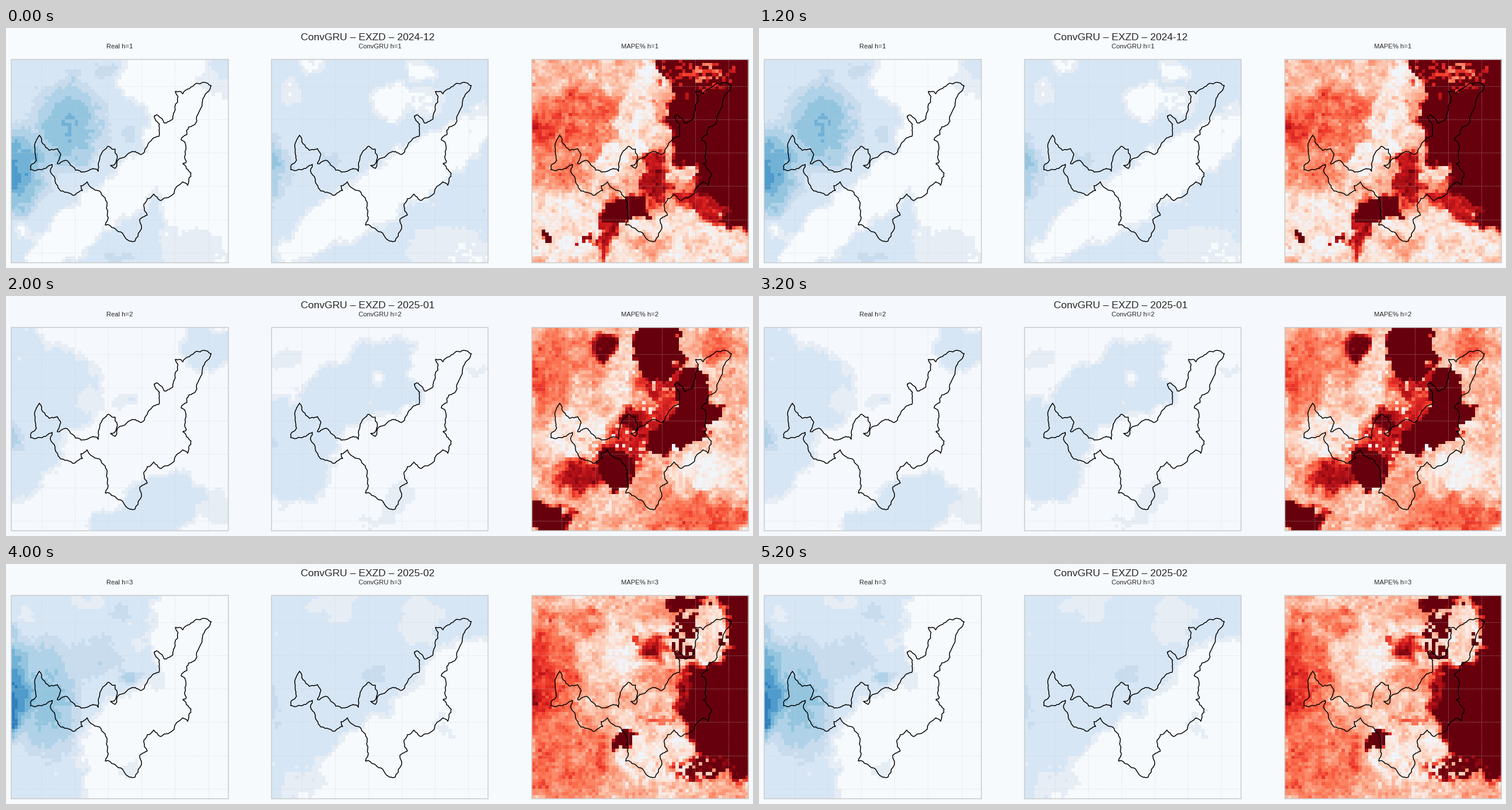
Animation of 1280 by 412 pixels, one loop 6000 ms. Source, as a matplotlib script:

```python
import numpy as np
import matplotlib.pyplot as plt
from matplotlib.animation import FuncAnimation
from matplotlib.colors import LinearSegmentedColormap, ListedColormap
from matplotlib.patches import Rectangle

W, H = 1280, 412
ROWS, COLS = 61, 65
LEFT, TOP, WIDTH, HEIGHT = 9, 54.2, 371.5, 348.6
STEP = 445.8
INK = "#262626"
MONTHS = ["2024-12", "2025-01", "2025-02"]
PAPER = ["#f7fbfe", "#f5f8fd", "#f6fafc"]
BLUES = ["#e6edf5", "#d7e6f5", "#c8dcee", "#b0d2e8", "#94c5df",
         "#72b2d7", "#4f9bcb", "#3080bd", "#1764ab", "#084a91"]
REDS = LinearSegmentedColormap.from_list("heat", [
    "#f1f5fa", "#fee3d6", "#fcbba1", "#fc9272", "#fb6a4a",
    "#ef3b2c", "#cb181d", "#a50f15", "#67000d"])

plt.rcParams["font.family"] = "Liberation Sans"


def smooth(a, times):
    """Spread each cell over its neighbours."""
    for _ in range(times):
        p = np.pad(a, 1, mode="edge")
        a = (p[:-2] + 2 * p[1:-1] + p[2:]) / 4
        a = (a[:, :-2] + 2 * a[:, 1:-1] + a[:, 2:]) / 4
    return a


class Field:
    """A gridded map of ragged, tilted ellipses, in pixels of the left panel."""

    def __init__(self, base, seed):
        self.rng = np.random.default_rng(seed)
        x = LEFT + (np.arange(COLS) + 0.5) * WIDTH / COLS
        y = TOP + (np.arange(ROWS) + 0.5) * HEIGHT / ROWS
        self.x, self.y = (g + 4 * self.noise(1) + 4 * self.noise(6)
                          for g in np.meshgrid(x, y))
        self.base = base
        self.v = np.full((ROWS, COLS), float(base))

    def noise(self, times=0):
        n = smooth(self.rng.normal(size=(ROWS, COLS)), times)
        return n / n.std()

    def dist(self, cx, cy, rx, ry, tilt):
        c, s = np.cos(np.radians(tilt)), np.sin(np.radians(tilt))
        dx, dy = self.x - cx, self.y - cy
        return np.hypot((dx * c + dy * s) / rx, (dy * c - dx * s) / ry)

    def spot(self, value, cx, cy, rx, ry, tilt=0, soft=0.1, density=1):
        """Flat patch with an edge that fades over the share `soft`."""
        d = self.dist(cx, cy, rx, ry, tilt)
        w = np.clip((1 - d) / soft + 0.5, 0, 1)
        w *= self.rng.random(w.shape) < density
        self.v += (value - self.v) * w

    def peak(self, top, cx, cy, rx, ry):
        """Rounded hill that rises from the base level."""
        d = self.dist(cx, cy, rx, ry, 0)
        hill = self.base + (top - self.base) * (1 - d ** 2)
        self.v = np.maximum(self.v, hill)

    def rain(self):
        return np.clip(np.round(smooth(self.v, 1) + 0.15 * self.noise()), 0, 10)

    def heat(self):
        grain = 0.05 * self.noise() + 0.05 * self.noise(2)
        return np.clip(self.v + grain, 0, 1)


def real_1():
    f = Field(2, 1)
    f.spot(0, 275, 92, 78, 62)
    f.spot(0, 322, 190, 80, 110)
    f.spot(0, 180, 295, 220, 38, -40)
    f.spot(0, 340, 300, 75, 130)
    f.spot(1, 325, 378, 62, 32)
    f.spot(1, 352, 92, 25, 22)
    f.spot(2, 376, 75, 18, 18)
    f.spot(0, 32, 353, 12, 11)
    f.spot(3, 172, 73, 18, 18)
    f.spot(3, 205, 183, 17, 10)
    f.spot(3, 185, 396, 34, 9)
    f.peak(5.6, 105, 170, 72, 92)
    f.peak(7, 5, 240, 82, 92)
    return f.rain()


def real_2():
    f = Field(0, 2)
    f.spot(2, 85, 165, 78, 75)
    f.spot(2, 10, 200, 100, 145)
    f.spot(2, 345, 90, 48, 42)
    f.spot(1, 355, 360, 28, 36)
    f.spot(2, 265, 360, 80, 48, -20)
    f.spot(2, 185, 390, 42, 25)
    f.spot(1, 145, 175, 24, 13)
    f.spot(1.6, 208, 186, 13, 16)
    f.peak(4, 5, 240, 32, 75)
    return f.rain()


def real_3():
    f = Field(2, 3)
    f.spot(0, 342, 120, 98, 125)
    f.spot(0, 300, 335, 175, 133)
    f.spot(1, 40, 86, 17, 14)
    f.spot(0.7, 145, 66, 22, 12)
    f.spot(0, 215, 138, 18, 14)
    f.spot(1, 212, 358, 16, 10)
    f.spot(1, 85, 358, 24, 9)
    f.spot(3, 197, 78, 15, 19)
    f.spot(4.2, 215, 192, 18, 12)
    f.peak(3.4, 150, 160, 60, 45)
    f.peak(5, 70, 230, 66, 120)
    f.peak(7.5, 0, 210, 65, 110)
    f.peak(11, 0, 252, 34, 52)
    return f.rain()


def model_1():
    f = Field(2, 4)
    f.spot(0, 215, 270, 235, 46, -33)
    f.spot(0, 213, 122, 25, 27)
    f.spot(0, 269, 74, 24, 17)
    f.spot(0.5, 268, 128, 28, 22)
    f.spot(0.7, 45, 108, 18, 20)
    f.spot(0, 79, 66, 23, 9)
    f.spot(1, 315, 385, 75, 42)
    f.spot(0.4, 345, 388, 45, 25, density=0.6)
    f.peak(3.2, 110, 222, 28, 18)
    f.peak(3.4, 25, 245, 24, 50)
    f.peak(5.2, 5, 238, 30, 65)
    return f.rain()


def model_2():
    f = Field(0, 5)
    f.spot(2, 150, 160, 120, 58, -38)
    f.spot(2, 40, 265, 75, 88)
    f.spot(2, 225, 170, 40, 28, -20)
    f.spot(0, 195, 138, 11, 12)
    f.spot(1, 40, 108, 25, 14)
    f.spot(1, 225, 345, 20, 32, 25)
    f.spot(1, 190, 386, 28, 9)
    f.spot(1, 360, 130, 13, 8)
    f.peak(3.3, 5, 248, 30, 60)
    return f.rain()


def model_3():
    f = Field(2, 6)
    f.spot(0, 267, 386, 330, 150, -38)
    f.spot(0, 345, 195, 75, 65)
    f.spot(1, 262, 96, 34, 46)
    f.spot(0.8, 110, 72, 42, 22)
    f.spot(1.2, 60, 372, 34, 24)
    f.spot(1, 300, 282, 18, 20, density=0.5)
    f.spot(3, 187, 190, 18, 13)
    f.spot(3, 5, 245, 18, 42)
    return f.rain()


def error_1():
    f = Field(0.25, 7)
    f.spot(0.48, 85, 172, 100, 62, soft=0.5)
    f.spot(0.42, 65, 245, 50, 36, soft=0.5)
    f.spot(0.65, 25, 180, 20, 22, soft=0.8)
    f.spot(0.08, 198, 145, 40, 85, 12, soft=0.4)
    f.spot(0.08, 150, 228, 50, 26, -15, soft=0.4)
    f.spot(0.1, 65, 335, 95, 60, soft=0.4)
    f.spot(0.1, 240, 370, 140, 45, soft=0.4)
    f.spot(0.27, 208, 378, 36, 22, soft=0.5)
    f.spot(1.4, 330, 70, 100, 55)
    f.spot(1.4, 365, 165, 118, 135)
    f.spot(1.4, 365, 290, 58, 58)
    f.spot(0.3, 238, 122, 15, 26, soft=0.5)
    f.spot(0.4, 300, 78, 20, 14, density=0.8)
    f.spot(0.7, 290, 85, 75, 25, density=0.25)
    f.spot(0.8, 300, 305, 50, 22, 25, soft=0.4)
    f.spot(0.15, 262, 252, 30, 14, soft=0.4)
    f.spot(0.85, 222, 258, 22, 46, soft=0.3)
    f.spot(0.8, 140, 345, 14, 60, soft=0.5)
    f.spot(1.4, 168, 312, 40, 25, -10, soft=0.3)
    f.spot(1.5, 30, 352, 8, 8)
    f.spot(0.9, 100, 364, 13, 8, density=0.7)
    return f.heat()


def error_2():
    f = Field(0.23, 8)
    f.spot(0.48, 35, 130, 38, 80, soft=0.5)
    f.spot(0.36, 95, 110, 32, 42, soft=0.5)
    f.spot(0.48, 325, 85, 45, 32, soft=0.5)
    f.spot(0.08, 95, 238, 68, 42, soft=0.4)
    f.spot(0.08, 165, 150, 32, 24, soft=0.4)
    f.spot(0.08, 320, 300, 70, 38, soft=0.4)
    f.spot(0.5, 310, 378, 90, 34, soft=0.5)
    f.spot(0.35, 210, 340, 35, 45, soft=0.5)
    f.spot(0.75, 190, 240, 95, 42, -40, soft=0.6, density=0.85)
    f.spot(0.75, 240, 150, 55, 28, soft=0.8, density=0.8)
    f.spot(0.85, 95, 310, 48, 26, soft=0.7)
    f.spot(1.4, 221, 85, 40, 62)
    f.spot(1.4, 285, 172, 30, 55, -12)
    f.spot(1.4, 265, 230, 75, 28, -30)
    f.spot(1.4, 153, 295, 32, 38)
    f.spot(1, 180, 210, 20, 18, soft=0.5)
    f.spot(1, 136, 92, 19, 20, soft=0.6)
    f.spot(1.4, 32, 378, 52, 26, 12, soft=0.3)
    f.spot(-1, 249, 266, 7, 7)
    return f.heat()


def error_3():
    f = Field(0.24, 9)
    f.spot(0.52, 32, 200, 52, 100, soft=0.5)
    f.spot(0.72, 12, 205, 28, 65, soft=0.8)
    f.spot(0.45, 75, 335, 80, 75, soft=0.5)
    f.spot(0.42, 98, 98, 34, 24, soft=0.6)
    f.spot(0.55, 41, 80, 10, 13, soft=0.8)
    f.spot(0.1, 160, 150, 30, 65, soft=0.5)
    f.spot(0.36, 215, 78, 40, 20, soft=0.6)
    f.spot(0.36, 235, 192, 30, 26, soft=0.6)
    f.spot(0.1, 215, 325, 62, 65, soft=0.4)
    f.spot(0.5, 235, 265, 40, 7, soft=0.6)
    f.spot(1.4, 370, 235, 98, 130, soft=0.15)
    f.spot(1.4, 365, 80, 48, 70)
    f.spot(1.4, 275, 62, 40, 12)
    f.spot(0.15, 312, 120, 38, 60, soft=0.3, density=0.9)
    f.spot(1.2, 268, 120, 22, 48, density=0.55)
    f.spot(0.9, 268, 225, 14, 32, soft=0.5)
    f.spot(1, 315, 352, 65, 20, soft=0.5, density=0.7)
    f.spot(0.32, 345, 382, 34, 16, soft=0.5)
    f.spot(0.6, 188, 131, 9, 10)
    f.spot(1, 219, 147, 20, 20, soft=0.8)
    f.spot(1.4, 166, 302, 19, 15, -30)
    return f.heat()


def border(seed=4):
    """Region outline: key corners roughened by midpoint displacement."""
    p = np.reshape([
        351, 99, 326, 95, 303, 113, 290, 109, 288, 145, 285, 157, 271, 163,
        258, 149, 254, 151, 263, 165, 262, 186, 247, 195, 232, 217, 222, 212,
        210, 215, 187, 241, 179, 236, 187, 233, 187, 208, 175, 203, 163, 217,
        158, 246, 149, 241, 139, 246, 119, 244, 102, 227, 88, 233, 92, 223,
        88, 207, 74, 210, 57, 184, 50, 197, 52, 227, 42, 243, 68, 241, 79, 234,
        84, 263, 89, 274, 114, 287, 131, 279, 128, 271, 139, 264, 163, 283,
        173, 303, 175, 325, 170, 338, 184, 343, 205, 361, 221, 366, 229, 329,
        242, 321, 237, 313, 242, 293, 253, 285, 266, 296, 303, 264, 311, 270,
        317, 249, 303, 233, 309, 229, 306, 195, 300, 192, 313, 170, 327, 160,
        336, 130, 351, 99], (-1, 2)).astype(float)
    rng = np.random.default_rng(seed)
    for _ in range(3):
        d = np.diff(p, axis=0)
        normal = np.column_stack([-d[:, 1], d[:, 0]])
        mid = p[:-1] + d / 2 + normal * rng.uniform(-0.17, 0.17, (len(d), 1))
        rough = np.empty((2 * len(p) - 1, 2))
        rough[::2], rough[1::2] = p, mid
        p = rough
    return p


FIELDS = [[real_1(), model_1(), error_1()],
          [real_2(), model_2(), error_2()],
          [real_3(), model_3(), error_3()]]

fig = plt.figure(figsize=(W / 100, H / 100), dpi=100)
ax = fig.add_axes([0, 0, 1, 1])
ax.axis("off")


def label(x, y, size):
    return ax.text(x, y, "", fontsize=size, color=INK, ha="center", va="baseline")


outline = border()
images, labels = [], []
for k in range(3):
    x0 = LEFT + k * STEP
    images.append(ax.imshow(
        FIELDS[0][k], extent=(x0, x0 + WIDTH, TOP + HEIGHT, TOP), aspect="auto",
        interpolation="nearest", cmap=REDS, vmin=0, vmax=1, zorder=1))
    grid = dict(color="#cccccc", lw=0.5, ls="--", alpha=0.5, zorder=2)
    for i in range(6):
        gx, gy = x0 + 51.8 + 57.15 * i, 99.7 + 57.2 * i
        ax.plot([gx, gx], [TOP, TOP + HEIGHT], **grid)
        ax.plot([x0, x0 + WIDTH], [gy, gy], **grid)
    ax.plot(outline[:, 0] + k * STEP, outline[:, 1], color="black", lw=1.05,
            solid_joinstyle="round", zorder=3)
    ax.add_patch(Rectangle((x0, TOP), WIDTH, HEIGHT, fill=False,
                           ec="#cccccc", lw=1.1, zorder=4))
    labels.append(label(x0 + WIDTH / 2, 34.8, 8.15))
title = label(620, 20.6, 12.6)
ax.set_xlim(0, W)
ax.set_ylim(H, 0)


def draw(i):
    fig.set_facecolor(PAPER[i])
    blues = ListedColormap([PAPER[i]] + BLUES)
    for k, name in enumerate(["Real", "ConvGRU", "MAPE%"]):
        images[k].set_data(FIELDS[i][k])
        if k < 2:
            images[k].set_cmap(blues)
            images[k].set_clim(-0.5, 10.5)
        labels[k].set_text(f"{name} h={i + 1}")
    title.set_text(f"ConvGRU – EXZD – {MONTHS[i]}")
    return images + labels + [title]


anim = FuncAnimation(fig, draw, frames=3, interval=2000, repeat=True, blit=False)
plt.show()
```
